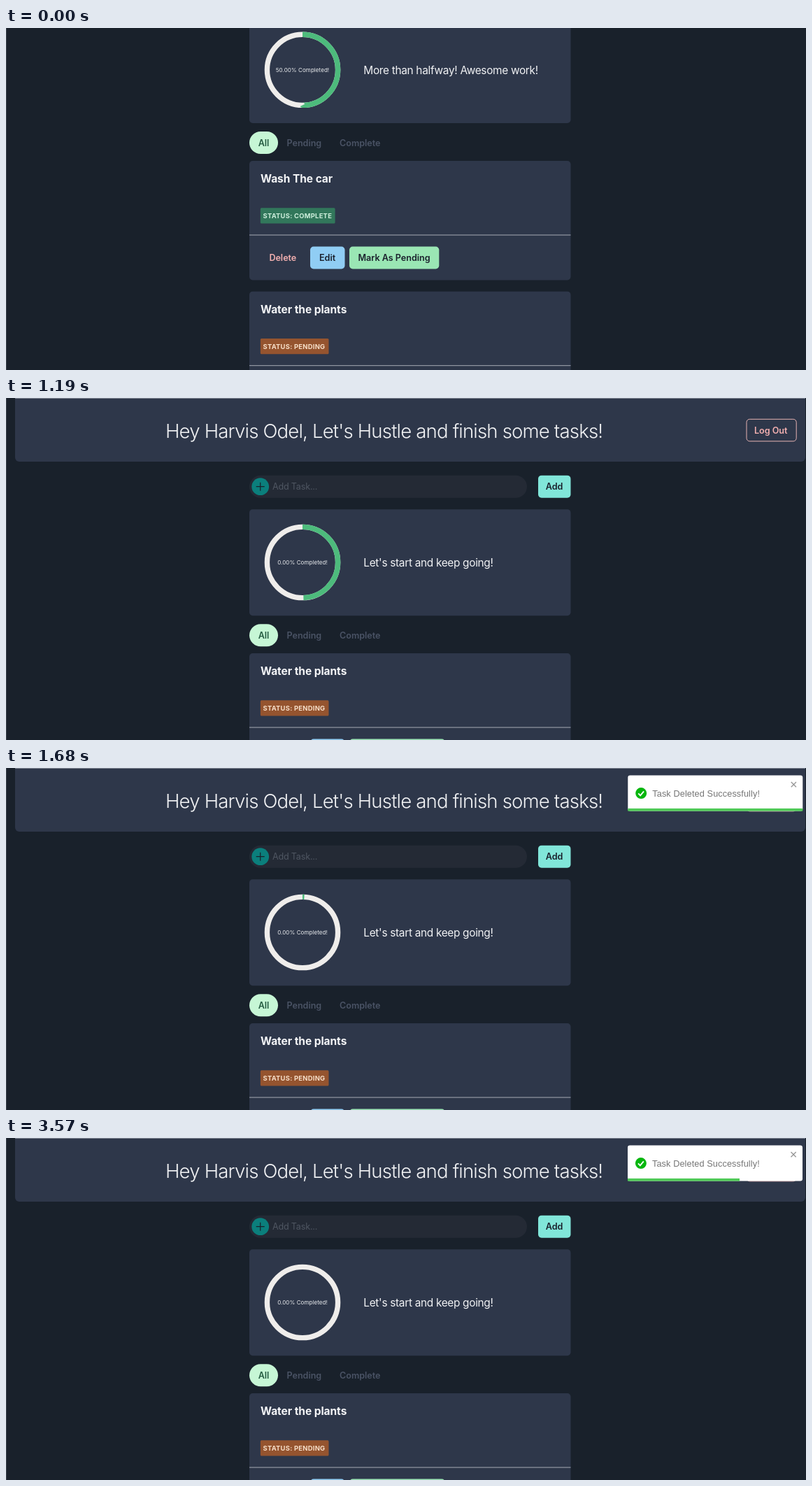
Write an HTML page that moves like this. It is 1144 px wide and 489 px high and loops after 3640 ms.

```html
<!DOCTYPE html>
<html lang="en">
<head>
<meta charset="utf-8">
<title>Task list</title>
<style>
  html, body { margin: 0; width: 100%; height: 100%; overflow: hidden; background: #19212b; }
  svg { display: block; width: 1144px; height: 489px; }
  text { font: 600 12.6px Inter, sans-serif; font-optical-sizing: none; letter-spacing: -.03px; fill: #1a202c; }
  .panel { fill: #2e374a; }
  .heading { font-weight: 300; font-size: 27.6px; letter-spacing: -.84px; fill: #f1f2f4; }
  .message { font-weight: 400; font-size: 15.4px; letter-spacing: -.31px; fill: #f1f2f4; }
  .title { font-weight: 700; font-size: 15.5px; letter-spacing: -.05px; fill: #f4f5f7; }
  .badge { font-weight: 700; font-size: 9.4px; letter-spacing: .27px; fill: #f7dfc9; }
  .badge.ok { fill: #cdeedb; }
  .percent { font-weight: 400; font-size: 8px; letter-spacing: .06px; fill: #eceef0; text-anchor: middle; }
  .tab { fill: #4a5365; }
  .tab.on { fill: #245a41; }
  .hint { font-weight: 400; letter-spacing: -.2px; fill: #4f5662; }
  .red { fill: #f3b0b0; }
  .toast { font: 400 12.7px "Liberation Sans", Arial, sans-serif; letter-spacing: .11px; fill: #757575; }
</style>
</head>
<body>
<svg viewBox="0 0 1144 489">
  <defs>
    <g id="card">
      <rect class="panel" x="348" width="459.5" height="170.5" rx="4.8"/>
      <path d="M348 106H807.5" stroke="#a7acb5"/>
      <rect x="435" y="122.5" width="49.5" height="32" rx="4.8" fill="#90cdf4"/>
      <text x="448" y="143">Edit</text>
    </g>
    <g id="pending">
      <use href="#card"/>
      <text class="title" x="364" y="31">Water the plants</text>
      <rect x="363.8" y="67.3" width="97.7" height="22.3" rx="1.6" fill="#95542f"/>
      <text class="badge" x="367.6" y="82">STATUS: PENDING</text>
      <rect x="491" y="122.5" width="137" height="32" rx="4.8" fill="#9ae6b4"/>
    </g>
  </defs>

  <rect width="1144" height="489" fill="#19212b"/>
  <path d="M.5 0V489" stroke="#38414b"/>

  <g id="top">
    <path class="panel" d="M13 0H1143V85a6 6 0 0 1-6 6H19a6 6 0 0 1-6-6Z"/>
    <path d="M13 .4H1143" stroke="#848b97"/>
    <text class="heading" x="228" y="57">Hey Harvis Odel, Let's Hustle and finish some tasks!</text>
    <rect x="1059" y="30.3" width="71.2" height="31.5" rx="4.4" fill="none" stroke="#e6b3b2"/>
    <text class="red" x="1070" y="51">Log Out</text>
    <rect x="348" y="110.7" width="397" height="32" rx="16" fill="#242a35"/>
    <circle cx="363.7" cy="126.7" r="12.4" fill="#0b7f7c"/>
    <path d="M357.7 126.7h12M363.7 120.7v12" stroke="#19212b" stroke-width="1.2"/>
    <text class="hint" x="381" y="131.3">Add Task...</text>
    <rect x="761" y="110.7" width="46.5" height="32" rx="4.8" fill="#81e6d9"/>
    <text x="771.7" y="131.3">Add</text>
  </g>

  <g id="page">
    <rect class="panel" x="348" y="-16" width="459.5" height="152" rx="4.8"/>
    <g fill="none" stroke-width="7.4">
      <circle cx="424" cy="59.8" r="50.6" stroke="#efedeb"/>
      <circle id="ring" cx="424" cy="59.8" r="50.6" stroke="#4dbb7c" pathLength="100" transform="rotate(-90 424 59.8)"/>
    </g>
    <text class="percent" id="percent" x="424" y="62.5"></text>
    <text class="message" id="message" x="511.3" y="66"></text>
    <rect x="348" y="148" width="41" height="32" rx="16" fill="#c6f6d5"/>
    <text class="tab on" x="360.7" y="168.7">All</text>
    <text class="tab" x="401.5" y="168.7">Pending</text>
    <text class="tab" x="477" y="168.7">Complete</text>
  </g>

  <g id="done" transform="translate(0 190)">
    <use href="#card"/>
    <text class="title" x="364" y="31">Wash The car</text>
    <rect x="363.8" y="67.3" width="106.8" height="22.3" rx="1.6" fill="#32775b"/>
    <text class="badge ok" x="367.6" y="82">STATUS: COMPLETE</text>
    <rect id="press" x="363.8" y="122.5" width="65" height="32" rx="4.8" fill="#feb2b2"/>
    <text class="red" x="376.4" y="143">Delete</text>
    <rect x="491" y="122.5" width="128.3" height="32" rx="4.8" fill="#9ae6b4"/>
    <text x="503.5" y="143">Mark As Pending</text>
  </g>
  <use id="next" href="#pending"/>

  <g id="toast">
    <rect x="889" y="10.5" width="250" height="51" rx="3.2" fill="#fff"/>
    <rect id="bar" x="889" y="57.8" height="3.8" fill="#4fca57"/>
    <circle cx="907.9" cy="36.1" r="8" fill="#07b60e"/>
    <path d="M904 36.4l2.8 2.9 5-5.9" fill="none" stroke="#fff" stroke-width="1.9"/>
    <text class="toast" x="924" y="40.6">Task Deleted Successfully!</text>
    <path d="M1122.5 20l7.2 7.2M1129.7 20l-7.2 7.2" stroke="#969696" stroke-width="1.3"/>
  </g>
</svg>
<script>
const LOOP = 3640, STEP = 70, DELETED = 1190;
const $ = id => document.getElementById(id);
const clamp = x => Math.min(1, Math.max(0, x));

function bezier(x1, y1, x2, y2) {
  const at = (a, b, s) => 3 * (1 - s) ** 2 * s * a + 3 * (1 - s) * s * s * b + s ** 3;
  return x => {
    let lo = 0, hi = 1;
    for (let i = 0; i < 24; i++) {
      const mid = (lo + hi) / 2;
      if (at(x1, x2, mid) < x) lo = mid; else hi = mid;
    }
    return x <= 0 ? 0 : x >= 1 ? 1 : at(y1, y2, lo);
  };
}
const ease = bezier(.25, .1, .25, 1);
const bounce = bezier(.215, .61, .355, 1);

// [progress, horizontal offset] stops of the toast's entrance
const stops = [[0, 2343], [.6, -19.5], [.75, 7.8], [.9, -3.9], [1, 0]];
function toastOffset(p) {
  const i = Math.max(1, stops.findIndex(s => p <= s[0]));
  const [p0, x0] = stops[i - 1], [p1, x1] = stops[i];
  return x0 + (x1 - x0) * bounce((p - p0) / (p1 - p0));
}

function draw(t) {
  const deleted = t >= DELETED;
  const show = (id, on) => $(id).style.display = on ? '' : 'none';
  show('top', deleted);
  show('toast', deleted);
  show('done', !deleted);
  $('page').setAttribute('transform', `translate(0 ${deleted ? 175.2 : 0})`);
  $('next').setAttribute('transform', `translate(0 ${deleted ? 365 : 376.7})`);
  $('percent').textContent = (deleted ? '0.00' : '50.00') + '% Completed!';
  $('message').textContent = deleted ? "Let's start and keep going!" : 'More than halfway! Awesome work!';
  $('press').setAttribute('opacity', t >= 1120 ? .22 : .12 * ease((t - 600) / 200));

  const done = 50 * (1 - ease((t - 1179) / 600));
  $('ring').setAttribute('stroke-dasharray', `${done} 100`);
  show('ring', done > 0);

  const p = clamp((t - 1126) / 700);
  $('toast').setAttribute('transform', `translate(${toastOffset(p)} 0)`);
  $('toast').setAttribute('opacity', bounce(p / .6));
  $('bar').setAttribute('width', 250 - Math.max(0, t - 1703) * .0482);
}

const start = performance.now();
function tick() {
  const t = (performance.now() - start) % LOOP;
  draw(Math.floor(t / STEP) * STEP);
  requestAnimationFrame(tick);
}
tick();
</script>
</body>
</html>
```
